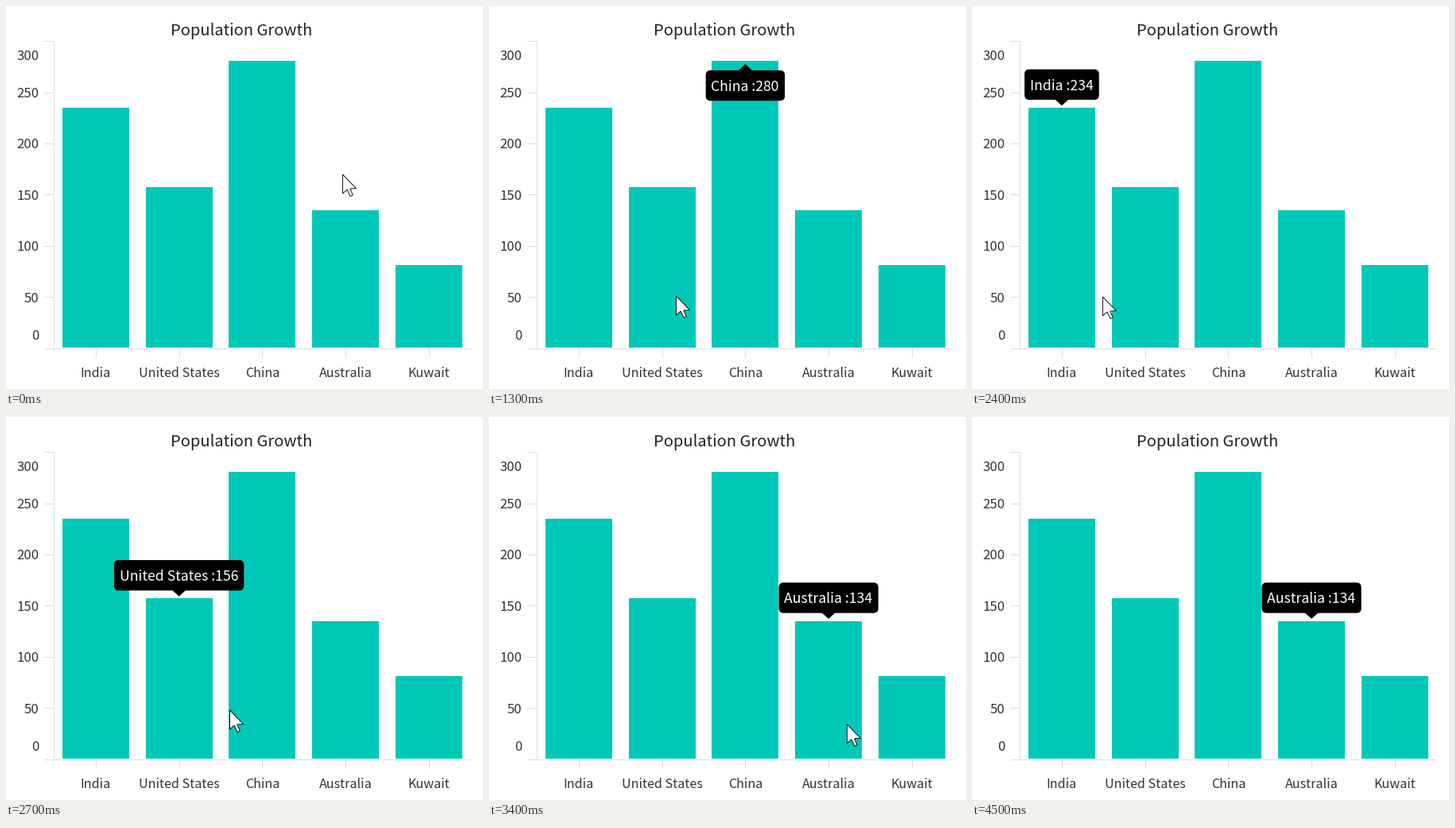
These frames come from a looping animation (600x482 px, 5.2 s). A matplotlib script:

```python
import numpy as np
import matplotlib.pyplot as plt
from matplotlib.animation import FuncAnimation
from matplotlib.patches import FancyBboxPatch, Polygon, Rectangle

W, H, DPI = 600, 482, 100
FRAMES, STEP = 52, 100
LEFT, BASE, SCALE = 60.55, 429.2, 1.2867
FLOOR, TICK_GAP = 430.5, 64.4
PITCH = 104.73
BAR_W = 0.8 * PITCH
TEAL, GRID, INK = "#00c8b8", "#dcdcdc", "#333333"
FONT = "Noto Sans CJK JP"

BARS = [("India", 234), ("United States", 156), ("China", 280),
        ("Australia", 134), ("Kuwait", 80)]

# pointer moves: first step, last step, where it ends; it rests in between
START = (423, 211)
MOVES = [(0, 5, (420, 316)), (7, 13, (235, 364)), (17, 22, (112, 365)),
         (23, 24, (164, 365)), (24, 29, (359, 370)), (29, 31, (389, 375)),
         (31, 38, (531, 400)), (39, 41, (460, 416)), (41, 45, (424, 500))]
ARROW = np.array([(0, 0), (0, 24), (5.5, 19), (9.6, 27.5),
                  (12.8, 26), (9.2, 18), (17, 17.6)])


def px(n):
    return n * 72 / DPI


def center(i):
    return LEFT + PITCH * (i + 0.5)


def top(i):
    return BASE - SCALE * BARS[i][1]


def text(x, y, s, size, color=INK, ha="center", z=2):
    return ax.text(x, y, s, fontsize=px(size), color=color, ha=ha,
                   va="baseline", family=FONT, zorder=z)


def line(xs, ys):
    ax.plot(xs, ys, color=GRID, lw=px(1), zorder=1, solid_capstyle="butt")


def pointer_at(n):
    pos = np.array(START, float)
    for first, last, goal in MOVES:
        part = np.clip((n - first) / (last - first), 0, 1)
        pos += (np.array(goal) - pos) * part
    return pos


def bar_under(x, y):
    for i in range(len(BARS)):
        if abs(x - center(i)) <= BAR_W / 2 and top(i) <= y <= FLOOR:
            return i
    return None


def active_bar(n):
    """The last bar hovered before this step; the tooltip trails by one."""
    for k in range(n - 1, -1, -1):
        hit = bar_under(*pointer_at(k))
        if hit is not None:
            return hit
    return None


fig = plt.figure(figsize=(W / DPI, H / DPI), dpi=DPI, facecolor="white")
ax = fig.add_axes([0, 0, 1, 1])
ax.set_xlim(0, W)
ax.set_ylim(H, 0)
ax.axis("off")

text(295.8, 37, "Population Growth", 20.1, "#222222")

line([59.5, 59.5], [44, FLOOR])
line([60, 584], [FLOOR, FLOOR])
for k in range(7):
    y = FLOOR - TICK_GAP * k
    line([48, 60], [y, y])
    # the end labels are pulled inside the axis
    shift = 17 * ((k == 6) - (k == 0))
    text(41.5, y + 6.5 + shift, str(50 * k), 16.8, ha="right")

for i, (name, value) in enumerate(BARS):
    line([center(i)] * 2, [FLOOR, 442])
    text(center(i), 467, name, 16.1)
    ax.add_patch(Rectangle((center(i) - BAR_W / 2, top(i)), BAR_W,
                           430 - top(i), fc=TEAL, ec="none", zorder=2))

box = FancyBboxPatch((0, 0), 10, 38, fc="black", ec="none", zorder=4,
                     boxstyle="round,pad=0,rounding_size=6")
beak = Polygon([(0, 0)] * 3, fc="black", ec="none", zorder=4)
ax.add_patch(box)
ax.add_patch(beak)
tip = text(0, 0, "", 17.6, "white", z=5)
arrow = Polygon(ARROW, fc="white", ec="black", lw=px(0.9), zorder=6,
                joinstyle="miter")
ax.add_patch(arrow)


def draw(n):
    arrow.set_xy(ARROW + pointer_at(n) + (0.5, 1))

    i = active_bar(n)
    for part in (box, beak, tip):
        part.set_visible(i is not None)
    if i is not None:
        name, value = BARS[i]
        cx, peak = center(i), top(i)
        flip = peak < 100  # no room above the tallest bar
        y0 = peak + 12 if flip else peak - 48.4
        edge, point = (y0 + 1, y0 - 7.8) if flip else (y0 + 37, y0 + 45.6)
        tip.set_text(f"{name} :{value}")
        tip.set_position((cx - 0.3, y0 + 26))
        width = tip.get_window_extent().width + 14
        box.set_bounds(cx - width / 2, y0, width, 38.3)
        beak.set_xy([(cx - 9.5, edge), (cx, point), (cx + 9.5, edge)])
    return arrow, box, beak, tip


anim = FuncAnimation(fig, draw, frames=FRAMES, interval=STEP,
                     init_func=lambda: draw(0), repeat=True, blit=False)
plt.show()
```
